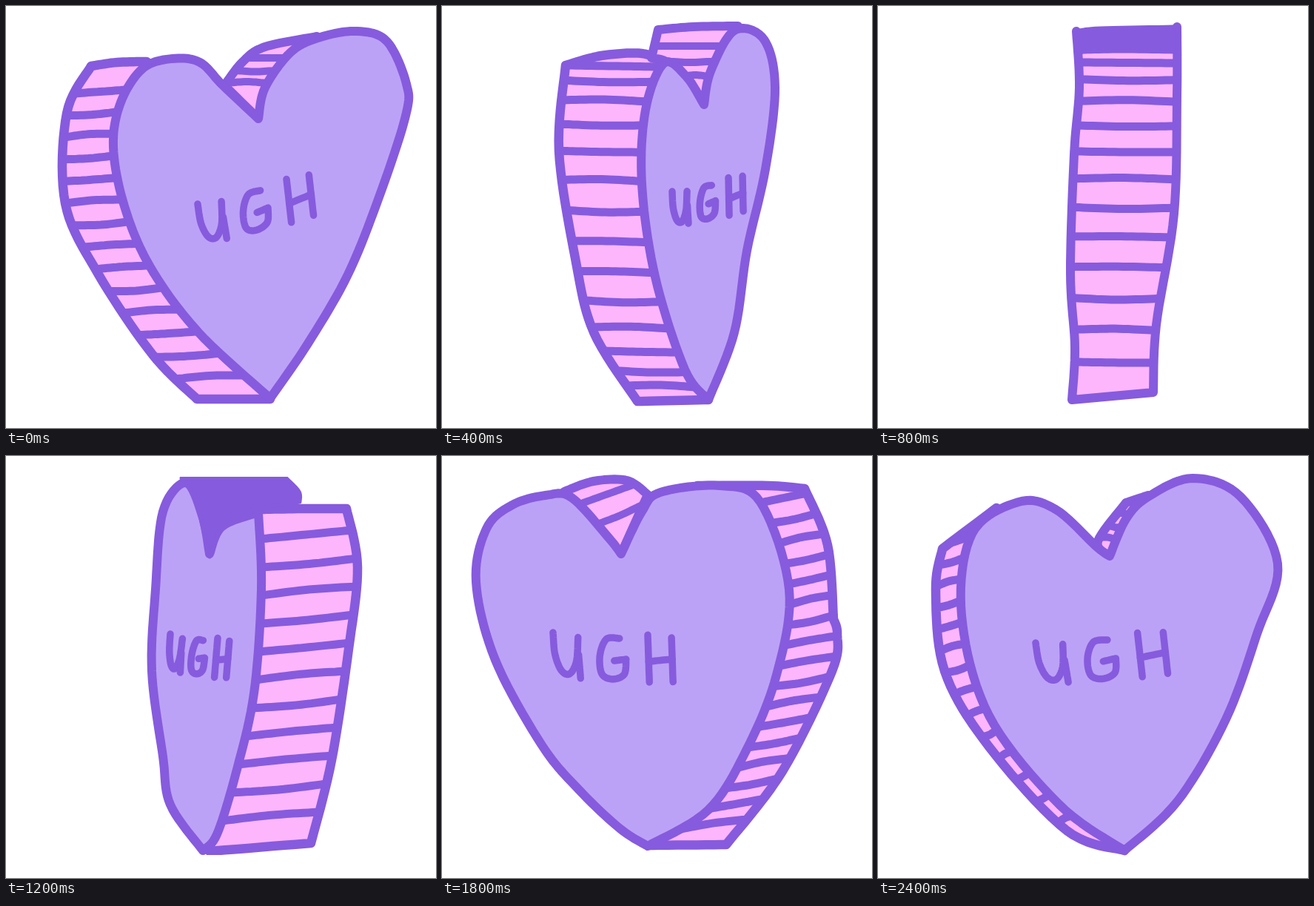
An HTML page for the animation above (2600 ms loop, 581 by 569 pixels).

```html
<!DOCTYPE html>
<html lang="en">
<head>
<meta charset="utf-8">
<title>Turning candy heart</title>
<style>
html, body { margin: 0; width: 100%; height: 100%; overflow: hidden; background: #fff; }
svg { display: block; width: 100%; height: 100%; }
path { stroke-linecap: round; stroke-linejoin: round; }
</style>
</head>
<body>
<svg viewBox="0 0 581 569" role="img" aria-label="UGH">
  <clipPath id="crop"><rect y="28" width="581" height="510"/></clipPath>
  <g id="heart"></g>
</svg>
<script>
const INK = '#865bdd', FACE = '#bca2f6', PINK = '#fdb6fb';
const STEP = 200;

// Spacing of the ribs along the rim
const even = t => t;
const swell = t => (t + t * t * (3 - 2 * t)) / 2;
const grow = t => t ** 1.2;

// Key points of a few views: a space continues a smooth curve, "|" makes a corner.
// Both halves of the face run from cleft to tip.
const rightTurn = {
  wallOn: 'left', cleft: '341,152', tip: '357,529',
  right: '350,110 385,62 425,42 475,34 515,48 541,105 540,148 505,255 462,362 408,455',
  left: '293,107 262,76 225,71 185,84 155,130 145,190 160,270 195,352 260,440',
  wall: '190,75 150,76 115,81|82,145 80,266 125,362 198,470 258,530|357,530',
  notch: '341,152|295,107|320,75 350,55 420,41',
  ribs: { count: 14, from: 118, to: 503, slant: -5, ease: even },
  notchRibs: { count: 3, from: 70, to: 104, slant: 0, ease: even },
  word: { at: [259, 267], across: [150, -42], down: [6, 53] }
};

const rightNarrow = {
  wallOn: 'left', cleft: '354,133', tip: '360,531',
  right: '363,88 395,33 435,45 450,110 437,220 412,330 395,440',
  left: '330,95 300,77 275,140 270,240 288,365 328,490',
  wall: '300,76 270,64 215,67 167,80|158,195 180,340 205,440 264,533|360,531',
  notch: '354,133|310,80 283,70|292,32|340,28 400,27',
  ribs: { count: 14, from: 80, to: 512, slant: 2, ease: swell },
  notchRibs: { count: 3, from: 54, to: 95, slant: 0, ease: even },
  word: { at: [311, 250], across: [95, -23], down: [1, 46] }
};

const edge = {
  wall: '268,34 272,110 265,200 260,360 266,460 262,531',
  inner: '404,28 404,120 400,280 376,430 372,521',
  cap: '266,34|300,30 404,28|404,62|330,61 276,62|268,70',
  ribs: { count: 12, from: 76, to: 480, slant: 1, ease: grow }
};

const leftNarrow = {
  crop: true, wallOn: 'right', cleft: '275,132', tip: '266,532',
  right: '292,95 341,76|345,180 335,320 310,430 285,510',
  left: '265,80 243,36 212,75 202,180 197,290 212,405 222,470',
  wall: '345,72 400,71 460,71|475,150 463,260 440,410 412,522|275,533',
  cap: '237,30|379,30|396,48 397,62|345,70 315,78 290,95|275,136|254,46',
  ribs: { count: 11, from: 100, to: 480, slant: 12, ease: even },
  word: { at: [222, 240], across: [80, 7], down: [-4, 48] }
};

const leftTurn = {
  crop: true, wallOn: 'right', cleft: '263,122', tip: '280,533',
  right: '285,85 330,66 368,90 387,170 380,330 335,440',
  left: '243,60 205,36 150,60 141,85 132,180 165,350 205,455',
  wall: '330,66 400,58 460,63 488,82|497,180 480,340 392,534|280,534',
  notch: '263,122|300,66|365,54 350,31|250,32|232,42',
  cap: '232,44|250,48 272,67 298,64|263,124',
  ribs: { count: 12, from: 77, to: 502, slant: 10, ease: even },
  notchRibs: { count: 2, from: 34, to: 46, slant: 17, ease: even },
  word: { at: [190, 236], across: [121, 14], down: [1, 62] }
};

const leftWide = {
  wallOn: 'right', cleft: '242,132', tip: '278,526',
  right: '270,75 295,49 375,40 430,62 469,180 452,295 412,395 360,477',
  left: '225,110 175,56 140,53 95,66 60,98 46,170 72,275 135,390 185,450 240,502',
  wall: '345,40 440,40 490,44|521,120 529,220|534,240 527,290 460,425 384,524|278,525',
  notch: '242,132|278,52|250,33 205,34 165,48',
  ribs: { count: 17, from: 50, to: 490, slant: 13, ease: even },
  notchRibs: { count: 2, from: 38, to: 65, slant: 27, ease: even },
  word: { at: [150, 238], across: [160, 4], down: [2, 58] }
};

const rightWide = {
  wallOn: 'left', cleft: '313,135', tip: '333,532',
  right: '335,85 365,55 425,30 490,55 540,145 512,240 470,355 405,465',
  left: '295,122 240,72 190,62 127,105 113,215 150,350 245,470',
  wall: '160,70 87,125|78,180 90,290 150,392 255,505 333,532',
  notch: '313,135|297,115 335,63|365,53',
  ribs: { count: 14, from: 118, to: 495, slant: -10, ease: even },
  notchRibs: { count: 3, from: 76, to: 110, slant: 3, ease: even },
  word: { at: [213, 252], across: [172, -17], down: [6, 54] }
};

// Letters in a unit box
const WORD = [
  '0,0 .01,.5 .06,.88 .13,.95 .19,.65 .21,.1', '.21,.5 .22,1.05',
  '.56,.1 .45,.12 .39,.5 .4,.93 .49,1.05 .59,.93 .61,.58|.51,.62',
  '.8,0 .8,1.1', '1,.05 1,1.08', '.8,.62 1,.55'
];

// Moves left edge, fold and right edge of a view to new x positions.
const turn = (view, from, to, dy = 0) => ({ ...view, move([x, y]) {
  const i = x < from[1] ? 0 : 1;
  const k = (x - from[i]) / (from[i + 1] - from[i]);
  return [to[i] + k * (to[i + 1] - to[i]), y + dy];
} });

const VIEWS = [
  rightTurn,
  turn(rightTurn, [79, 145, 541], [113, 206, 492]),
  rightNarrow,
  turn(rightNarrow, [157, 268, 451], [198, 328, 418]),
  edge,
  turn(leftNarrow, [196, 343, 476], [222, 300, 436]),
  leftNarrow,
  leftTurn,
  turn(leftWide, [45, 468, 534], [82, 428, 516], 2),
  leftWide,
  turn(leftWide, [45, 468, 534], [45, 498, 532], 8),
  turn(rightWide, [78, 114, 540], [45, 60, 546], 4),
  rightWide
];

// Catmull-Rom curve through the points, sampled as a polyline
function smooth(pts) {
  const out = [pts[0]], parts = 10;
  for (let i = 0; i < pts.length - 1; i++) {
    const b = pts[i], c = pts[i + 1];
    const a = pts[i - 1] || b, d = pts[i + 2] || c;
    for (let s = 1; s <= parts; s++) {
      const t = s / parts;
      out.push(b.map((v, n) => v + t / 2 * (c[n] - a[n]
        + t * (2 * a[n] - 5 * v + 4 * c[n] - d[n] + t * (3 * v - a[n] - 3 * c[n] + d[n])))));
    }
  }
  return out;
}

function curve(text) {
  let line = [];
  for (const run of text.split('|')) {
    const pts = run.split(' ').map(p => p.split(',').map(Number));
    line = line.concat(smooth([...line.slice(-1), ...pts]));
  }
  return line;
}

// First place where a line crosses height y
function xAt(line, y) {
  for (let i = 1; i < line.length; i++) {
    const [x0, y0] = line[i - 1], [x1, y1] = line[i];
    if (y0 !== y1 && (y0 - y) * (y1 - y) <= 0) return x0 + (x1 - x0) * (y - y0) / (y1 - y0);
  }
  return line[line.length - 1][0];
}

function ribLines(outer, inner, { count, from, to, slant, ease }) {
  return Array.from({ length: count }, (_, i) => {
    const y = from + (to - from) * ease(i / (count - 1));
    const a = [xAt(outer, y), y], b = [xAt(inner, y + slant), y + slant];
    const bend = 2 * Math.sin(i * 2.3);
    return smooth([a, [(a[0] + b[0]) / 2, (a[1] + b[1]) / 2 + bend], b]);
  });
}

const wordLines = ({ at, across, down }) => WORD.map(text =>
  curve(text).map(([u, v]) => at.map((o, n) => o + u * across[n] + v * down[n])));

function paint(view) {
  const move = view.move || (p => p);
  const path = (line, fill, stroke, width) => {
    const d = 'M' + line.map(p => move(p).map(v => v.toFixed(1)).join(' ')).join('L');
    return `<path d="${d}" fill="${fill}" stroke="${stroke}" stroke-width="${width}"/>`;
  };
  const strokes = (lines, width) => lines.map(line => path(line, 'none', INK, width)).join('');
  const upward = line => [...line].reverse();

  const half = side => curve(`${view.cleft}|${view[side]}|${view.tip}`.replace(/\|(?=[^|]*$)/, ' '));
  const wall = curve(view.wall);
  let svg = '';

  if (view.inner) {
    const inner = curve(view.inner);
    svg += path([...wall, ...upward(inner)], PINK, INK, 12);
    svg += strokes(ribLines(wall, inner, view.ribs), 11);
  } else {
    const right = half('right'), left = half('left');
    const near = view.wallOn === 'left' ? left : right;
    const far = view.wallOn === 'left' ? right : left;
    svg += path(wall, PINK, INK, 12.5);
    if (view.notch) {
      const notch = curve(view.notch);
      svg += path(notch, PINK, INK, 12);
      svg += strokes(ribLines(notch, far, view.notchRibs), 10);
    }
    svg += strokes(ribLines(upward(wall), upward(near), view.ribs), 11);
    svg += path([...right, ...upward(left)], FACE, INK, 12);
    svg += strokes(wordLines(view.word), 9.5);
  }
  if (view.cap) svg += path(curve(view.cap), INK, INK, 5);
  return svg;
}

const heart = document.getElementById('heart');
const drawings = VIEWS.map(paint);
let shown = -1;

function draw(time) {
  const i = Math.floor(Math.max(0, time) / STEP) % VIEWS.length;
  if (i === shown) return;
  shown = i;
  heart.innerHTML = drawings[i];
  heart.setAttribute('clip-path', VIEWS[i].crop ? 'url(#crop)' : 'none');
}

const start = performance.now();
function tick(now) {
  draw(now - start);
  requestAnimationFrame(tick);
}
draw(0);
requestAnimationFrame(tick);
</script>
</body>
</html>
```
